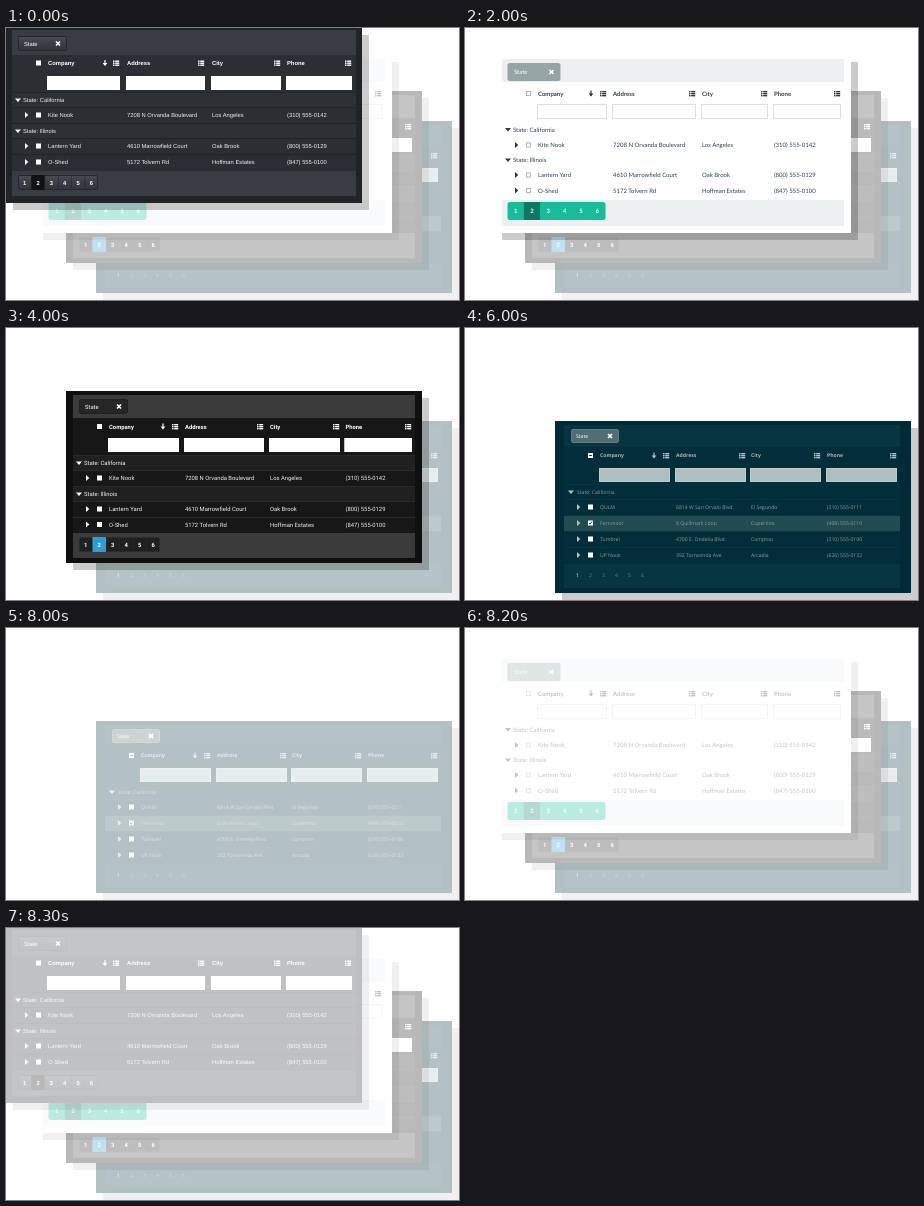
An HTML page with a canvas that plays this animation: 453 px wide and 272 px high, repeating every 8400 ms.

```html
<!DOCTYPE html>
<html lang="en">
<head>
<meta charset="utf-8">
<title>Grid themes</title>
<style>
html, body { margin: 0; width: 100%; height: 100%; overflow: hidden; background: #fff; }
canvas { display: block; width: 100vw; height: 100vh; }
</style>
</head>
<body>
<canvas id="stage" width="453" height="272"></canvas>
<script>
const ctx = document.getElementById('stage').getContext('2d');
const HEADINGS = ['Company', 'Address', 'City', 'Phone'];
const FADE = .7;
const SHADOW = .2;
const SLATE = ['#484e55', '#3a3f44', '#313539'];

// A string is a group heading, an array is a data row.
const stores = [
  'State: California',
  ['Kite Nook', '7208 N Orvanda Boulevard', 'Los Angeles', '(310) 555-0142'],
  'State: Illinois',
  ['Lantern Yard', '4610 Marrowfield Court', 'Oak Brook', '(800) 555-0129'],
  ['O-Shed', '5172 Tolvern Rd', 'Hoffman Estates', '(847) 555-0100']
];
const westStores = [
  'State: California',
  ['QULM', '6814 W San Orvalo Blvd', 'El Segundo', '(310) 555-0111'],
  ['Fernmoor', '8 Quillmark Loop', 'Cupertino', '(408) 555-0110'],
  ['Tumbrel', '4700 E. Ondelia Blvd.', 'Compton', '(310) 555-0190'],
  ['UP Nook', '392 Torravinda Ave.', 'Arcadia', '(626) 555-0132']
];

// Boxes are [x, y, width, height]; columns are [left, right].
const cards = [
  {
    box: [0, 0, 356, 175], font: '"Liberation Sans", Arial, sans-serif', size: 5.8,
    bg: '#202429', body: [6, 27, 344, 116], bodyFill: '#2b2f34', line: '#202328', groupFill: '#2d3136',
    bars: [[6, 2, 344, 25], [6, 143, 344, 25]], barFill: '#383d44',
    chip: [12, 8, 49, 15], chipFill: SLATE, chipEdge: '#24282c', chipText: '#fff', chipX: 18,
    cols: [[42, 113], [121, 198], [206, 274], [281, 345]], headY: 35, filter: [49, 12],
    input: '#fff', inputEdge: '#fff', text: '#eee', head: '#fff', icon: '#fff',
    rows: stores, rowY: [72, 87, 103, 118, 134], groupX: 9, arrowX: 19, checkX: 30, sortX: 99,
    pager: [12, 147, 80, 15], pageFill: SLATE, pageEdge: '#24282c', pageText: '#fff',
    current: 1, currentFill: '#101214'
  },
  {
    box: [30, 27, 356, 178], font: 'Lato, sans-serif', size: 6,
    bg: '#fff', body: [37, 54, 342, 118], bodyFill: '#fff', line: '#fff', groupFill: '#fff',
    bars: [[37, 31, 342, 23], [37, 172, 342, 26]], barFill: '#ecf0f1',
    chip: [42.5, 35, 53, 18], chipFill: '#95a5a6', chipEdge: '#95a5a6', chipText: '#fff', chipX: 49,
    cols: [[73, 141], [148, 230], [237, 302], [309, 375]], headY: 65.5, filter: [77, 13],
    input: '#fff', inputEdge: '#dce0e3', text: '#2c3e50', head: '#2c3e50', icon: '#2c3440',
    rows: stores, rowY: [101.5, 117, 132, 147, 162.5], groupX: 40, arrowX: 50, checkX: 61, sortX: 126,
    checkEdge: '#b4b4b4', pager: [42.5, 174, 98, 18], pageFill: '#18bc9c', pageEdge: '#18bc9c',
    pageText: '#fff', current: 1, currentFill: '#0f7864'
  },
  {
    box: [60, 63, 356, 172], font: 'Roboto, sans-serif', size: 5.85,
    bg: '#101010', body: [67, 90, 342, 115], bodyFill: '#171717', line: '#292929', groupFill: '#202020',
    bars: [[67, 67, 342, 23], [67, 205, 342, 25]], barFill: '#3b3b3b',
    chip: [73, 71, 49, 15], chipFill: '#262626', chipEdge: '#202020', chipText: '#fff', chipX: 79,
    cols: [[103, 172], [179, 257], [264, 333], [339.5, 405]], headY: 98.5, filter: [111, 12],
    input: '#fff', inputEdge: '#fff', text: '#f0f0f0', head: '#fff', icon: '#fff',
    rows: stores, rowY: [135, 150, 166, 181, 196.5], groupX: 70, arrowX: 80, checkX: 91, sortX: 157,
    pager: [73, 209, 81, 15], pageFill: '#202020', pageEdge: '#2b2b2b', pageText: '#fff',
    current: 1, currentFill: '#2a9fd6'
  },
  {
    box: [90, 93, 356, 172], font: '"Open Sans", sans-serif', size: 5.1,
    bg: '#002b36', body: [99, 119, 336, 117], bodyFill: '#022e39', line: '#08343f', groupFill: '#022e39',
    bars: [[99, 97, 336, 22], [99, 236, 336, 24]], barFill: '#073642',
    chip: [106, 101, 48, 14], chipFill: '#536d74', chipEdge: '#647b80', chipText: '#fff', chipX: 111,
    cols: [[135, 204], [211, 280], [286, 355], [362, 431]], headY: 127.5, filter: [141, 12],
    input: '#afbfc0', inputEdge: '#c0cccc', text: '#8b9fa1', head: '#a9b8b9', icon: '#b7c2c2',
    rows: westStores, rowY: [164, 179, 195, 211, 227], groupX: 103, arrowX: 112, checkX: 123, sortX: 189,
    selected: 2, selectedFill: '#214c51', pager: [106, 240, 78, 14], pageText: '#2aa198', current: 0
  }
];

function rect([x, y, w, h], fill, edge) {
  ctx.fillStyle = fill;
  ctx.fillRect(x, y, w, h);
  if (!edge) return;
  ctx.strokeStyle = edge;
  ctx.lineWidth = 1;
  ctx.strokeRect(x + .5, y + .5, w - 1, h - 1);
}

// A list of colours becomes a vertical gradient.
function paint(fill, y, h) {
  if (!Array.isArray(fill)) return fill;
  const gradient = ctx.createLinearGradient(0, y, 0, y + h);
  fill.forEach((color, i) => gradient.addColorStop(i / (fill.length - 1), color));
  return gradient;
}

function rounded([x, y, w, h], fill, edge) {
  ctx.beginPath();
  ctx.roundRect(x + .5, y + .5, w - 1, h - 1, 1.5);
  ctx.fillStyle = paint(fill, y, h);
  ctx.fill();
  ctx.strokeStyle = edge;
  ctx.lineWidth = 1;
  ctx.stroke();
}

function shape(points, fill) {
  ctx.beginPath();
  points.forEach(([x, y]) => ctx.lineTo(x, y));
  ctx.fillStyle = fill;
  ctx.fill();
}

function path(points, color, width) {
  ctx.beginPath();
  points.forEach(([x, y]) => ctx.lineTo(x, y));
  ctx.strokeStyle = color;
  ctx.lineWidth = width;
  ctx.stroke();
}

function write(card, text, x, y, color, bold = false, align = 'left') {
  ctx.font = `${bold ? 'bold ' : ''}${card.size}px ${card.font}`;
  ctx.textAlign = align;
  ctx.fillStyle = color;
  ctx.fillText(text, x, y + .4);
}

function listIcon(x, y, color) {
  for (const dy of [-2.5, -.5, 1.5]) {
    rect([x, y + dy, 1.5, 1.4], color);
    rect([x + 2.2, y + dy, 4, 1.4], color);
  }
}

function checkbox(card, y) {
  rect([card.checkX, y - 2.5, 5, 5], '#fff', card.checkEdge);
}

function drawChip(card) {
  const [x, y, w, h] = card.chip;
  const mid = y + h / 2, cross = x + w - 9;
  rounded(card.chip, card.chipFill, card.chipEdge);
  write(card, 'State', card.chipX, mid, card.chipText);
  path([[cross - 2, mid - 2], [cross + 2, mid + 2]], '#fff', 1.6);
  path([[cross + 2, mid - 2], [cross - 2, mid + 2]], '#fff', 1.6);
}

function drawHeader(card) {
  const y = card.headY, x = card.sortX;
  const [filterY, filterH] = card.filter;
  checkbox(card, y);
  if (card.selected) rect([card.checkX + 1, y - .5, 3, 1], '#234');
  card.cols.forEach(([left, right], i) => {
    write(card, HEADINGS[i], left, y, card.head, true);
    listIcon(right - 6, y, card.icon);
    rect([left - 1, filterY - 1, right - left + 2, filterH + 2], card.input, card.inputEdge);
  });
  path([[x, y - 3], [x, y + 2]], card.icon, 1.2);
  shape([[x - 2.4, y], [x + 2.4, y], [x, y + 3]], card.icon);
}

function drawRow(card, row, i) {
  const y = card.rowY[i], [left, , width] = card.body;
  const group = typeof row === 'string', selected = card.selected === i;
  if (group) rect([left, y - 7, width, 15], card.groupFill);
  if (selected) rect([left, y - 7, width, 15], card.selectedFill);
  rect([left, Math.round(y) - 8, width, 1], card.line);
  if (group) {
    const x = card.groupX;
    shape([[x, y - 1.5], [x + 6, y - 1.5], [x + 3, y + 2]], card.icon);
    write(card, row, x + (card.selected ? 9 : 8), y, card.text);
    return;
  }
  const x = card.arrowX;
  shape([[x, y - 3], [x + 3.3, y], [x, y + 3]], card.icon);
  checkbox(card, y);
  if (selected) {
    const c = card.checkX;
    path([[c + 1, y], [c + 2, y + 1.2], [c + 4, y - 1.5]], '#234', .9);
  }
  row.forEach((text, col) => write(card, text, card.cols[col][0], y, card.text));
}

function drawPager(card) {
  const [x, y, w, h] = card.pager, step = w / 6, buttons = Boolean(card.pageFill);
  if (buttons) rounded(card.pager, card.pageFill, card.pageEdge);
  for (let i = 0; i < 6; i++) {
    const current = i === card.current;
    if (buttons && i) rect([x + i * step, y, .6, h], card.pageEdge);
    if (buttons && current) rect([x + i * step, y, step, h], card.currentFill);
    write(card, i + 1, x + (i + .5) * step, y + h / 2, current ? '#fff' : card.pageText, buttons, 'center');
  }
}

function drawCard(card, faded) {
  const [x, y, w, h] = card.box;
  rect([x + 7, y + 7, w, h], `rgba(0, 0, 0, ${faded ? SHADOW * (1 - FADE) : SHADOW})`);
  rect(card.box, card.bg);
  rect(card.body, card.bodyFill);
  card.bars.forEach(bar => rect(bar, card.barFill));
  drawChip(card);
  drawHeader(card);
  card.rows.forEach((row, i) => drawRow(card, row, i));
  drawPager(card);
  if (faded) rect(card.box, `rgba(255, 255, 255, ${FADE})`);
}

// Cards are removed one by one, then restacked as faded cards from the back.
function render(time) {
  const t = time % 8400;
  const restacking = t >= 8000;
  const front = restacking ? 3 - Math.floor((t - 8000) / 100) : Math.floor(t / 2000);
  rect([0, 0, 453, 272], '#fff');
  for (let i = 3; i >= front; i--) drawCard(cards[i], restacking || i > front);
}

ctx.textBaseline = 'middle';
ctx.textRendering = 'geometricPrecision';
const start = performance.now();
function tick() {
  render(performance.now() - start);
  requestAnimationFrame(tick);
}
tick();
</script>
</body>
</html>
```
